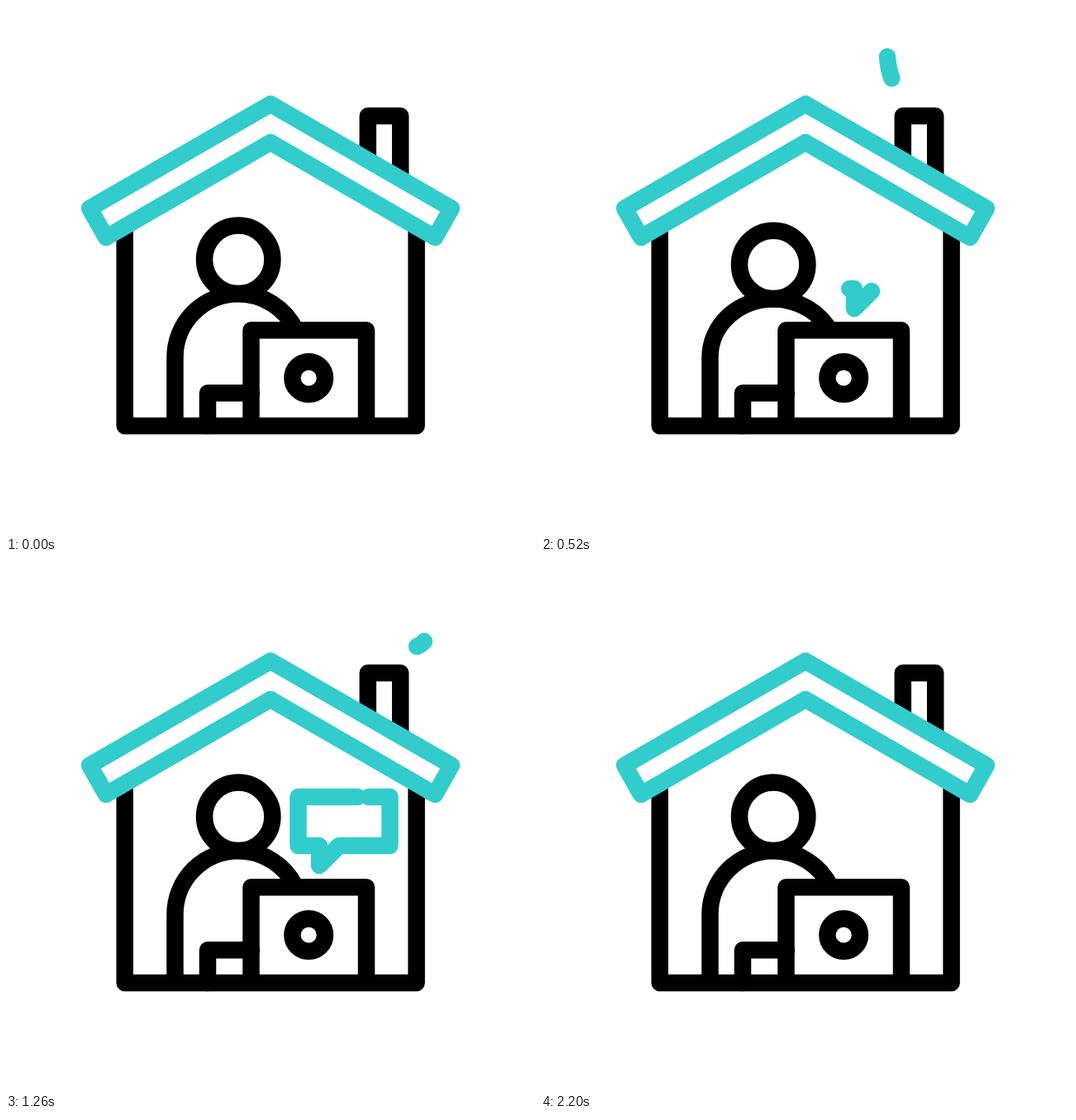
Animation, 640 px wide and 640 px high, one loop 2.22 s. Source, as an HTML page with a canvas:

```html
<!DOCTYPE html>
<html lang="en">
<head>
<meta charset="utf-8">
<title>Working from home</title>
<style>
  html, body { margin: 0; width: 100%; height: 100%; overflow: hidden; background: #fff; }
  canvas { display: block; width: 640px; height: 640px; }
</style>
</head>
<body>
<canvas id="stage" width="640" height="640"></canvas>
<script>
const ctx = document.getElementById('stage').getContext('2d');
const LOOP = 2220;
const BLACK = '#000';
const TEAL = '#33cccc';

function makeShape(d) {
  const el = document.createElementNS('http://www.w3.org/2000/svg', 'path');
  el.setAttribute('d', d);
  return { path: new Path2D(d), length: el.getTotalLength() };
}

const house = makeShape('M143.7 268V508H496.6V268');
const chimney = makeShape('M437.8 186V133H477.2V208.8');
const roof = makeShape('M320 118.6L101 244.8L121 280L320 165L519 280L539 244.8Z');
const laptop = makeShape('M296.5 508V392.3H436V508');
const desk = makeShape('M297 468.3H244V508');
const bubble = makeShape('M432 283H353.5V342H379V366L403 342H464.5V283Z');
const smoke = makeShape('M497 101C511 96 514 80 513 59C513 50 511 41 505 41' +
  'C499 41 496 48 491 54C489 28 474 12 454 12C430 12 417 36 419 61C420 76 423 86 428 95');

// [time in ms, distance along the smoke as a share of its length]
const SMOKE_HEAD = [[0, 0], [180, 0.19], [320, 0.352], [500, 0.965], [640, 1]];
const SMOKE_TAIL = [[0, 0], [180, 0], [320, 0.22], [500, 0.86], [680, 0.92], [740, 1]];

function ease(t, from, to) {
  const u = Math.min(1, Math.max(0, (t - from) / (to - from)));
  return u * u * (3 - 2 * u);
}

function along(keys, t) {
  for (let i = 1; i < keys.length; i++) {
    const [t0, v0] = keys[i - 1];
    const [t1, v1] = keys[i];
    if (t <= t1) return v0 + (v1 - v0) * (t - t0) / (t1 - t0);
  }
  return 1;
}

function stroke(shape, color, cap = 'butt') {
  ctx.strokeStyle = color;
  ctx.lineCap = cap;
  ctx.stroke(shape.path);
}

function strokePart(shape, from, to) {
  if (to - from < 0.001) return;
  if (to - from > 0.999) return stroke(shape, TEAL, 'round');
  const { length } = shape;
  ctx.setLineDash([(to - from) * length, length * 2]);
  ctx.lineDashOffset = -from * length;
  stroke(shape, TEAL, 'round');
  ctx.setLineDash([]);
}

function ring(x, y, radius) {
  ctx.beginPath();
  ctx.arc(x, y, radius, 0, Math.PI * 2);
  ctx.stroke();
}

function drawPerson(drop) {
  ctx.strokeStyle = BLACK;
  ctx.lineCap = 'butt';
  ring(281.2, 306.8 + drop, 41.2);
  ctx.beginPath();
  ctx.moveTo(204.5, 508);
  ctx.lineTo(204.5, 425);
  ctx.ellipse(281.2, 425, 76.7, 76.7 - drop, 0, Math.PI, Math.PI * 2 - 0.445);
  ctx.stroke();
}

function drawSmoke(t) {
  if (t > 0 && t < 740) strokePart(smoke, along(SMOKE_TAIL, t), along(SMOKE_HEAD, t));
}

function draw(t) {
  ctx.fillStyle = '#fff';
  ctx.fillRect(0, 0, 640, 640);
  ctx.lineWidth = 20.5;
  ctx.lineJoin = 'round';

  stroke(house, BLACK);
  stroke(chimney, BLACK);
  drawPerson(7 * (ease(t, 10, 670) - ease(t, 670, 960)));
  stroke(desk, BLACK, 'round');
  stroke(laptop, BLACK);
  ring(366.2, 450, 19.8);
  stroke(roof, TEAL);

  // The bubble spreads both ways from the tip of its tail.
  const reach = (ease(t, 430, 790) - ease(t, 1220, 1580)) / 2;
  strokePart(bubble, 0.5 - reach, 0.5 + reach);

  drawSmoke(t - 20);
  drawSmoke(t - 1220);
}

function tick() {
  draw(performance.now() % LOOP);
  requestAnimationFrame(tick);
}
tick();
</script>
</body>
</html>
```
